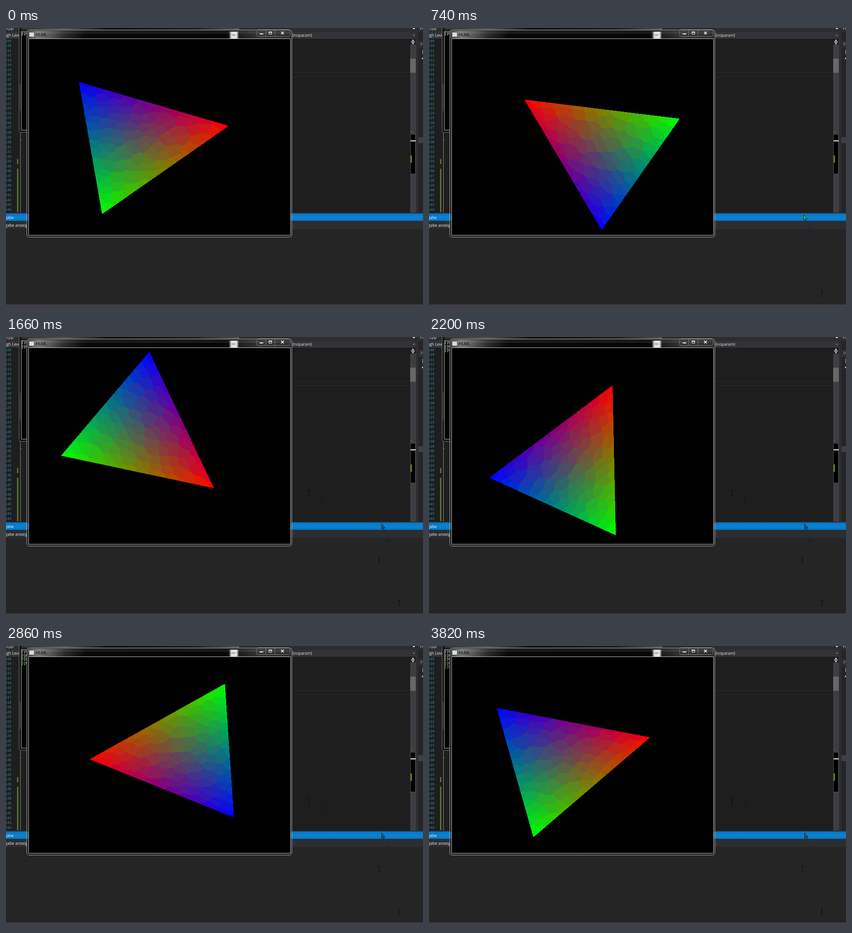
Animation, 911 px wide and 615 px high, one loop 3900 ms. Source, as an HTML page with a canvas:

```html
<!DOCTYPE html>
<html lang="de">
<head>
<meta charset="utf-8">
<title>Rotating triangle</title>
<style>
html, body { margin: 0; width: 100%; height: 100%; overflow: hidden; background: #252526; }
canvas { display: block; }
</style>
</head>
<body>
<canvas id="stage" width="911" height="615"></canvas>
<script>
const W = 911, H = 615, LOOP = 3900;
const ctx = document.getElementById('stage').getContext('2d');
const backdrop = document.createElement('canvas');
backdrop.width = W;
backdrop.height = H;
const bg = backdrop.getContext('2d');

const UI = '"Open Sans", "Noto Sans", sans-serif';
const MONO = '"DejaVu Sans Mono", monospace';
const SERIF = '"Noto Serif", serif';

// Client area of the render window and the triangle's half extents.
const view = { x: 50, y: 24, w: 571, h: 429 };
const center = { x: 335.5, y: 238.5 }, half = { x: 153, y: 146.7 };

// Each run of picture changes: first time, last time, number of steps.
const runs = [[0, 0, 1], [70, 590, 8], [670, 1130, 7], [1200, 1660, 7], [1740, 2200, 7],
  [2280, 2740, 7], [2860, 2860, 1], [2910, 3360, 7], [3440, 3820, 6]];
const ticks = runs.flatMap(([from, to, n]) => Array.from({ length: n }, (_, i) =>
  Math.floor((from + (n > 1 ? (to - from) * i / (n - 1) : 0)) / 10) * 10));

const turns = [[0, -9.5], [740, -146.1], [1660, -320.9], [2200, -424.6], [2740, -527],
  [2860, -543.7], [2910, -559.4], [3440, -659.9], [3820, -735.2]];

const prints = [[0, '#eeeeee'], [970, '#eeeeee'], [1890, '#b9e8b0'], [2860, '#93d98c'], [3820, '#b09048']];

// Pointer positions: start, end, x, y, shape, colour.
const pointers = [
  [510, LOOP, 858, 581, 'beam', '#080808'],
  [590, 670, 832, 442, 'arrow', '#e8e8e8'],
  [670, LOOP, 832, 442, 'arrow', '#25253a'],
  [740, 820, 819, 415, 'arrow', '#35d030'],
  [820, LOOP, 821, 415, 'arrow', '#145f9c'],
  [820, LOOP, 780, 394, 'beam', '#1c1c32'],
  [890, LOOP, 689, 353, 'beam', '#131313'],
  [970, LOOP, 648, 327, 'beam', '#201c22'],
  [1200, LOOP, 661, 341, 'beam', '#050505'],
  [1270, LOOP, 815, 488, 'beam', '#080808']
];

function rect(c, color, x, y, w, h) {
  c.fillStyle = color;
  c.fillRect(x, y, w, h);
}

function text(c, str, x, y, size, color, family = UI) {
  c.font = `${size}px ${family}`;
  c.textBaseline = 'alphabetic';
  c.fillStyle = color;
  c.fillText(str, x, y);
}

function poly(c, color, ...pts) {
  c.fillStyle = color;
  c.beginPath();
  for (let i = 0; i < pts.length; i += 2) c.lineTo(pts[i], pts[i + 1]);
  c.fill();
}

function outline(c, color, x, y, w, h, radius = 0) {
  c.strokeStyle = color;
  c.lineWidth = 1;
  c.beginPath();
  c.roundRect(x + .5, y + .5, w - 1, h - 1, radius);
  c.stroke();
}

function gradient(x0, x1, ...stops) {
  const g = bg.createLinearGradient(x0, 0, x1, 0);
  stops.forEach(([pos, color]) => g.addColorStop(pos, color));
  return g;
}

function drawEditor() {
  rect(bg, '#252526', 0, 0, W, H);
  rect(bg, '#1e1e1e', 0, 22, 883, 382);
  rect(bg, '#2d2d30', 0, 0, W, 9);
  rect(bg, '#333337', 0, 9, 896, 13);
  rect(bg, '#3f3f46', 0, 22, 896, 1);
  text(bg, '.cpp', -1, 4, 9, '#e0e0e0');
  text(bg, 'igh Leve', -1, 19, 8.5, '#e8e8e8');
  text(bg, '(noparam)', 626, 19, 8.8, '#e8e8e8');
  poly(bg, '#a0a0a0', 889, 15, 893, 15, 891, 17.5);
  poly(bg, '#f0f0f0', 888, 0, 894, 0, 891, 3);

  for (let n = 109; n <= 144; n++)
    text(bg, n, -1.5, 30.7 + (n - 109) * 10.54, 7.3, '#2b91af', MONO);
  rect(bg, '#577430', 24, 287, 3, 11);
  rect(bg, '#577430', 24, 308, 3, 95);
  rect(bg, '#8a8a8a', 31, 228, 1, 176);
  rect(bg, '#8a8a8a', 32, 244, 2, 1);
  rect(bg, '#2b2b2b', 620, 97, 263, 1);
  rect(bg, '#2b2b2b', 620, 106, 263, 1);

  // Scroll bar with its change map
  rect(bg, '#3e3e42', 883, 23, 13, 381);
  rect(bg, '#1b1b1c', 883, 23, 12, 13);
  rect(bg, '#f0f0f0', 885, 29, 8, 1);
  rect(bg, '#f0f0f0', 885, 31, 8, 1);
  poly(bg, '#f0f0f0', 886.5, 28, 891.5, 28, 889, 25);
  poly(bg, '#f0f0f0', 886.5, 33, 891.5, 33, 889, 36);
  rect(bg, '#686868', 883, 67, 12, 31);
  rect(bg, '#577430', 884, 226, 3, 2);
  rect(bg, '#000', 883, 232, 12, 88);
  outline(bg, '#55555a', 883, 232, 12, 88);
  rect(bg, '#fff', 884, 246, 11, 2);
  rect(bg, '#577430', 883, 279, 4, 16);

  // Side panel
  rect(bg, '#2d2d30', 896, 0, 5, 405);
  rect(bg, '#252526', 901, 9, 10, 395);
  rect(bg, '#2d2d30', 901, 28, 10, 16);
  text(bg, 'Pr', 904, 4, 9, '#d0d0d0');
  text(bg, 'Pr', 905, 39, 9, '#999999');
  rect(bg, '#d0d0d0', 910, 48, 1, 9);
  poly(bg, '#eeeeee', 911, 64, 911, 68, 908, 68);
  rect(bg, '#3f3f46', 901, 239, 10, 13);

  // Output pane
  rect(bg, '#2d2d30', 0, 404, W, 2);
  rect(bg, '#007acc', 0, 406, W, 16);
  for (let y = 411; y < 418; y += 2)
    for (let x = 19 + (y % 4 === 1 ? 2 : 0); x < W; x += 4) rect(bg, '#59a8de', x, y, 1, 1);
  text(bg, 'gabe', -3, 417.5, 8.8, '#fff');
  rect(bg, '#2d2d30', 0, 422, W, 18);
  text(bg, 'gabe anzeigen', -2, 435, 8.8, '#f0f0f0');
  rect(bg, '#46464a', 628, 426, 1, 12);
  rect(bg, '#3f3f46', 0, 605, W, 10);
}

function drawConsole() {
  rect(bg, '#141414', 28, 0, 481, 229);
  rect(bg, gradient(34, 508, [0, '#333'], [.2, '#555'], [.4, '#111'], [.8, '#222'], [1, '#555']), 34, 0, 474, 4);
  outline(bg, '#777777', 28, -10, 481, 239, 4);
  rect(bg, '#000', 33, 7, 14, 217);
  outline(bg, '#b0b0b0', 33, 7, 30, 217);
  rect(bg, '#3a3a3a', 30, 122, 2, 60);
}

function drawWindow() {
  bg.fillStyle = '#161616';
  bg.beginPath();
  bg.roundRect(45, 4, 580, 454, 5);
  bg.fill();
  rect(bg, gradient(47, 623, [0, '#444'], [.04, '#777'], [.09, '#555'], [.14, '#2c2c2c'], [.22, '#080808'],
    [.75, '#050505'], [.8, '#1c1c1c'], [.88, '#343434'], [1, '#2b2b2b']), 47, 6, 576, 17);
  rect(bg, 'rgba(255,255,255,.08)', 47, 6, 576, 7);
  rect(bg, gradient(487, 509, [0, 'rgba(235,235,235,0)'], [.25, '#dedede'], [.75, '#e6e6e6'],
    [1, 'rgba(235,235,235,0)']), 487, 8, 22, 15);
  rect(bg, '#aaaaaa', 493, 14, 8, 3);
  rect(bg, '#0b4f80', 46, 407, 3, 14);
  rect(bg, '#0b4f80', 622, 407, 2, 14);
  outline(bg, '#b4b4b4', 45, 4, 580, 454, 5);
  outline(bg, '#c4c4c4', 49, 23, 573, 431);
  rect(bg, '#d4dedd', 51, 10, 10, 9);
  text(bg, 'HLML', 65, 17.5, 9.2, '#050505');

  // Caption buttons
  outline(bg, '#777777', 547, 3, 74, 16, 3);
  rect(bg, '#777777', 567, 5, 1, 13);
  rect(bg, '#777777', 587, 5, 1, 13);
  rect(bg, '#fff', 554, 12, 8, 2);
  outline(bg, '#fff', 574, 8, 7, 6);
  rect(bg, '#fff', 574, 8, 7, 2);
  bg.strokeStyle = '#fff';
  bg.lineWidth = 1.6;
  bg.beginPath();
  bg.moveTo(601, 8); bg.lineTo(607, 14);
  bg.moveTo(607, 8); bg.lineTo(601, 14);
  bg.stroke();
}

function random(seed) {
  return () => {
    seed = (seed * 1664525 + 1013904223) >>> 0;
    return seed / 4294967296;
  };
}

// Jittered lattice of palette colours inside the RGB triangle.
const STEPS = 15;
function palette(seed) {
  const rnd = random(seed * 7919 + 17), rows = [];
  for (let i = 0; i <= STEPS; i++) {
    rows[i] = [];
    for (let j = 0; i + j <= STEPS; j++) {
      const corner = i === STEPS || j === STEPS || i + j === 0;
      const shift = () => corner ? 0 : (rnd() - .5) * .9;
      const r = Math.max(0, (i + shift()) / STEPS);
      const g = Math.max(0, (j + shift()) / STEPS);
      const sum = Math.max(1, r + g);
      rows[i][j] = [r / sum, g / sum, 1 - (r + g) / sum];
    }
  }
  return rows;
}

function nearest(rows, r, g, b) {
  const i0 = Math.round(r * STEPS), j0 = Math.round(g * STEPS);
  let best = 9, found;
  for (let i = Math.max(0, i0 - 1); i <= Math.min(STEPS, i0 + 1); i++)
    for (let j = Math.max(0, j0 - 1); j <= Math.min(STEPS - i, j0 + 1); j++) {
      const s = rows[i][j];
      const d = (s[0] - r) ** 2 + (s[1] - g) ** 2 + (s[2] - b) ** 2;
      if (d < best) { best = d; found = s; }
    }
  return found;
}

const pixels = ctx.createImageData(view.w, view.h);
function drawTriangle(angle, seed) {
  const cos = Math.cos(angle), sin = Math.sin(angle), rows = palette(seed);
  const data = pixels.data;
  for (let y = 0, k = 0; y < view.h; y++)
    for (let x = 0; x < view.w; x++, k += 4) {
      const px = (x + view.x + .5 - center.x) / half.x;
      const py = (y + view.y + .5 - center.y) / half.y;
      const along = px * cos + py * sin, across = py * cos - px * sin;
      const r = (along + 1) / 2, g = (1 - r + across) / 2, b = 1 - r - g;
      const color = r >= 0 && g >= 0 && b >= 0 ? nearest(rows, r, g, b) : null;
      for (let c = 0; c < 3; c++) data[k + c] = color ? color[c] * 255 : 0;
      data[k + 3] = 255;
    }
  ctx.putImageData(pixels, view.x, view.y);
}

function angleAt(t) {
  const i = Math.max(1, turns.findIndex(([time]) => time >= t));
  const [t0, a0] = turns[i - 1], [t1, a1] = turns[i];
  return (a0 + (a1 - a0) * (t - t0) / (t1 - t0)) * Math.PI / 180;
}

function drawPointer(x, y, shape, color) {
  if (shape === 'beam') {
    rect(ctx, color, x, y - 5, 1, 11);
    rect(ctx, color, x - 2, y - 6, 2, 1);
    rect(ctx, color, x + 1, y - 6, 2, 1);
    rect(ctx, color, x - 2, y + 6, 2, 1);
    rect(ctx, color, x + 1, y + 6, 2, 1);
    return;
  }
  poly(ctx, '#16202a', x - 1, y - 7, x - 1, y + 6, x + 2, y + 4, x + 4, y + 8, x + 6, y + 7, x + 4, y + 3, x + 8, y + 3);
  poly(ctx, color, x, y - 5, x, y + 4, x + 2, y + 2, x + 4, y + 6, x + 5, y + 6, x + 3, y + 2, x + 6, y + 2);
}

function render(index) {
  const t = ticks[index];
  ctx.drawImage(backdrop, 0, 0);
  ctx.save();
  ctx.beginPath();
  ctx.rect(34, 8, 11, 215);
  ctx.clip();
  prints.forEach(([time, color], i) => {
    if (t >= time) text(ctx, 'FPS', 34, 16.3 + i * 8.5, 9, color, SERIF);
  });
  ctx.restore();
  drawTriangle(angleAt(t), index + 1);
  for (const [from, to, x, y, shape, color] of pointers)
    if (t >= from && t < to) drawPointer(x, y, shape, color);
}

drawEditor();
drawConsole();
drawWindow();

let shown = -1;
const start = performance.now();
function loop() {
  const t = (performance.now() - start) % LOOP;
  const index = ticks.findLastIndex(time => time <= t);
  if (index !== shown) render(shown = index);
  requestAnimationFrame(loop);
}
loop();
</script>
</body>
</html>
```
